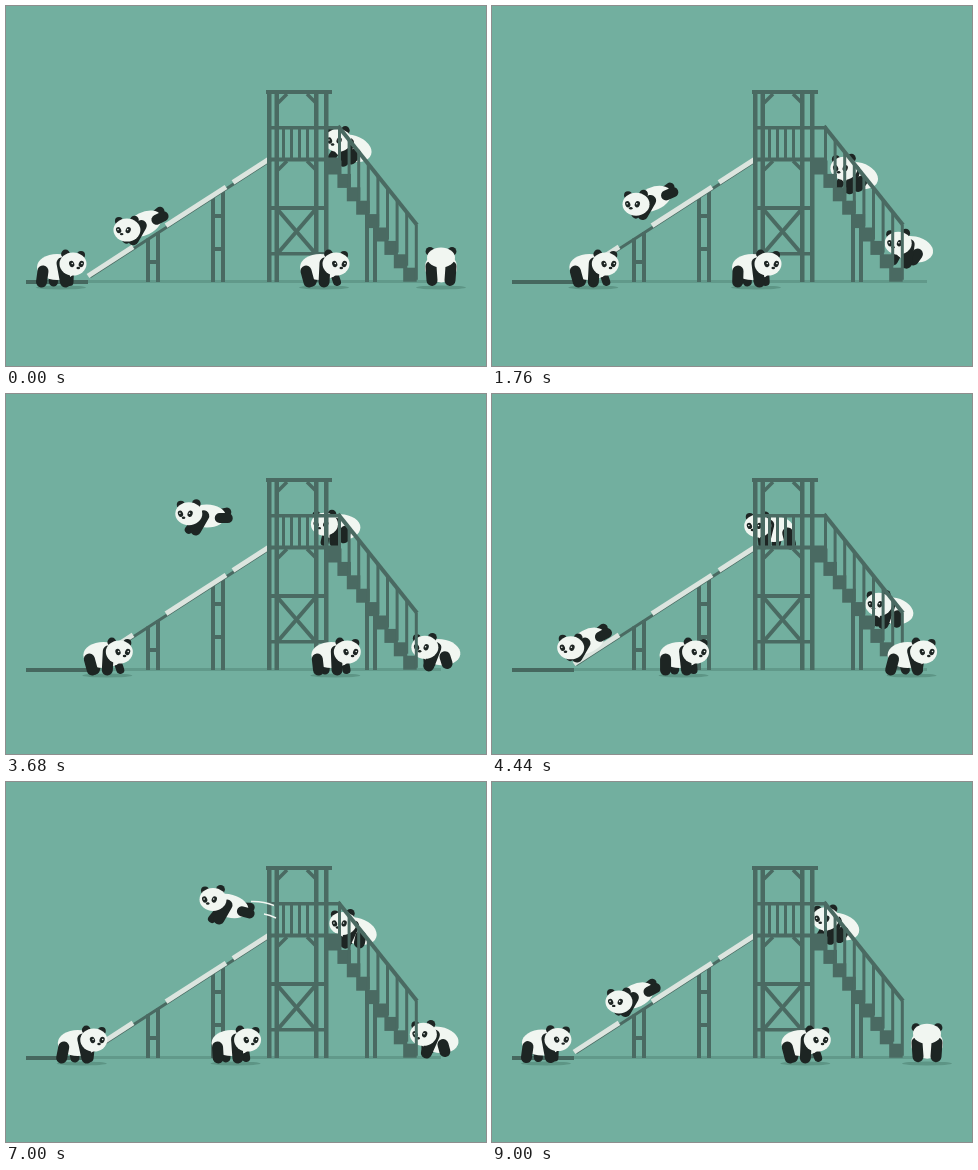
Animation of 480x360 px, one loop 9080 ms. Source, as an HTML page with a canvas:

```html
<!DOCTYPE html>
<html lang="en">
<head>
<meta charset="utf-8">
<title>Panda slide</title>
<style>
  html, body { margin: 0; width: 100%; height: 100%; overflow: hidden; background: #72af9f; }
  canvas { display: block; width: 480px; height: 360px; }
</style>
</head>
<body>
<canvas id="stage" width="480" height="360"></canvas>
<script>
const ctx = document.getElementById('stage').getContext('2d');
const BG = '#72af9f', WOOD = '#4a6a62', WHITE = '#f1f6f1', BLACK = '#1d2523';
const CHUTE = '#dce5df', GROUND = '#61998a', EDGE = '#46685f';
const LOOP = 9080, STEP = 40, LAST = 9000;

// Each panda runs the same lap, ahead of the clock by its own lead in seconds.
const LAP = 9.04;
const LEADS = [0, 2.215, 3.51, 5.75, 7.67];

const lerp = (a, b, k) => a + (b - a) * k;
const easeOut = k => 1 - (1 - k) ** 2;

// Each stage moves from the previous stage's end to its own; arc lifts the path.
// A positive lean raises the tail.
const STAGES = [
  { pose: 'walk',  end: 3.2,  x: 435, y: 262, lean: 0 },
  { pose: 'back',  end: 3.6,  x: 435, y: 260, lean: 0 },
  { pose: 'climb', end: 3.72, x: 428, y: 258, lean: -10 },
  { pose: 'climb', end: 5.75, x: 342, y: 142, lean: -18 },
  { pose: 'climb', end: 5.9,  x: 330, y: 134, lean: 0 },
  { pose: 'cross', end: 6.82, x: 276, y: 136, lean: 0, ease: easeOut },
  { pose: 'leap',  end: 7,    x: 220, y: 123, lean: -15 },
  { pose: 'leap',  end: 7.54, x: 154, y: 206, lean: 26, arc: 133 },
  { pose: 'slide', end: 7.95, x: 92,  y: 249, lean: 28 },
  { pose: 'slide', end: 8.1,  x: 66,  y: 256, lean: 8 },
  { pose: 'stop',  end: 8.3,  x: 49,  y: 257, lean: 0, ease: easeOut },
  { pose: 'stop',  end: 8.75, x: 47,  y: 257, lean: 0 },
  { pose: 'front', end: 8.85, x: 50,  y: 260, lean: 0 },
  { pose: 'walk',  end: LAP,  x: 55,  y: 262, lean: 0 }
];

function stateAt(p) {
  const i = STAGES.findIndex(s => p < s.end);
  const b = STAGES[i], a = STAGES.at(i - 1);
  const from = i ? a.end : 0;
  const k = (p - from) / (b.end - from), e = b.ease ? b.ease(k) : k;
  return {
    p,
    pose: b.pose,
    x: lerp(a.x, b.x, e),
    y: lerp(a.y, b.y, e) - (b.arc || 0) * k * (1 - k),
    lean: lerp(a.lean, b.lean, k) * Math.PI / 180
  };
}

function line(color, width, ...pts) {
  ctx.strokeStyle = color;
  ctx.lineWidth = width;
  ctx.beginPath();
  for (let i = 0; i < pts.length; i += 2) ctx.lineTo(pts[i], pts[i + 1]);
  ctx.stroke();
}

function oval(color, x, y, rx, ry = rx, turn = 0) {
  ctx.fillStyle = color;
  ctx.beginPath();
  ctx.ellipse(x, y, rx, ry, turn, 0, Math.PI * 2);
  ctx.fill();
}

function box(x, y, w, h, color = WOOD) {
  ctx.fillStyle = color;
  ctx.fillRect(x, y, w, h);
}

function drawSlide() {
  const at = x => 270 - (x - 82) * 0.645;
  for (const x of [140, 205]) {
    for (const post of [x, x + 10]) box(post, at(post), 4, 276 - at(post));
  }
  box(143, 254, 8, 4);
  for (const y of [208, 241]) box(208, y, 8, 4);
  line(WOOD, 3, 84, at(84) + 2, 266, at(266) + 2);
  for (const [a, b] of [[82, 127], [160, 220], [227, 265]]) line(CHUTE, 5, a, at(a), b, at(b));
  box(20, 274, 62, 4, EDGE);
}

function drawTower() {
  box(260, 84, 66, 4);
  for (const x of [261, 268.5, 308, 318]) box(x, 88, 4.5, 188);
  box(262, 120, 73, 3.5);
  box(261, 151.5, 72, 4);
  box(265, 200, 57, 4);
  box(265, 246, 57, 3.5);
  for (let x = 276; x < 308; x += 8) box(x, 123, 3, 29);
  for (const y of [88, 155]) {
    line(WOOD, 3.5, 272, y + 9, 281, y);
    line(WOOD, 3.5, 310, y + 9, 301, y);
  }
  line(WOOD, 4, 272, 204, 309, 247);
  line(WOOD, 4, 309, 204, 272, 247);
}

function drawStairs() {
  box(359, 207, 4, 69);
  box(367, 218, 4, 58);
  for (let i = 0; i < 9; i++) {
    box(322 + i * 9.4, 154.5 + i * 13.4, 13.5, 14);
    box(332 + i * 9.6, 122 + i * 12.1, 3, i < 8 ? 46 + i : 55);
  }
  line(WOOD, 4, 332, 120, 411, 219);
}

function drawFace(x, y, turn) {
  for (const side of [-1, 1]) {
    const ex = x + turn + side * 4.8;
    oval(BLACK, ex, y, 2.5, 3.2, side * 0.4);
    oval(WHITE, ex + 0.6, y - 0.5, 0.8);
  }
  oval(BLACK, x + turn * 1.5, y + 4, 1.8, 1.2);
}

function drawHead(x, y, turn) {
  oval(BLACK, x - 7.5, y - 10, 4.4);
  oval(BLACK, x + 8, y - 9, 4);
  oval(WHITE, x, y, 13.5, 11.5);
  drawFace(x, y, turn);
}

function drawWalker(swing, tuck) {
  const s = swing * 3;
  line(BLACK, 9, -9 + tuck, 2, -9 + tuck - s, 14 - tuck / 2);
  line(BLACK, 8, 9, 2, 10 + s, 14);
  oval(WHITE, -4, -1, 20, 13);
  line(BLACK, 11, -18 + tuck, 3, -18 + tuck + s, 14 - tuck / 2);
  line(BLACK, 11, 1, -5, 3 - s, 14);
}

function drawGlider() {
  line(BLACK, 9, -15, -2, -24, -4);
  oval(WHITE, -4, 0, 19, 11.5);
  line(BLACK, 10, -17, 2, -25, 2);
}

// Arms hang from the shoulder whatever the lean.
function drawArms() {
  line(BLACK, 8, 6, 4, 14, 14);
  line(BLACK, 11, -1, 0, 7, 14);
}

function drawUpright(facing) {
  oval(WHITE, 0, 1, 16, 15);
  for (const side of [-1, 1]) line(BLACK, 11, side * 10, 0, side * 9, 14);
  if (facing) {
    drawHead(0, -7, 0);
  } else {
    for (const side of [-1, 1]) oval(BLACK, side * 11, -15, 4.4);
    oval(WHITE, 0, -9, 14, 10);
  }
}

function drawPanda({ p, pose, x, y, lean }) {
  const gliding = pose === 'leap' || pose === 'slide';
  if (pose === 'walk' || pose === 'back') oval('rgba(80,132,118,.6)', x, 281.5, 25, 2);

  ctx.save();
  ctx.translate(x, y);
  ctx.lineCap = ctx.lineJoin = 'round';
  if (pose === 'back' || pose === 'front') {
    drawUpright(pose === 'front');
  } else {
    if (pose !== 'walk') ctx.scale(-1, 1);
    ctx.save();
    ctx.rotate(lean);
    if (gliding) drawGlider();
    else drawWalker(pose === 'stop' ? 0 : Math.cos((p - 2.2) / 0.6 * Math.PI * 2), pose === 'climb' ? 9 : 0);
    ctx.restore();
    if (gliding) drawArms();
    const [hx, hy] = gliding ? [14, -2] : [12, -4];
    const c = Math.cos(lean), s = Math.sin(lean);
    drawHead(hx * c - hy * s, hx * s + hy * c, 3.5);
  }
  ctx.restore();
}

function drawSwoosh({ p }) {
  if (p < 6.9 || p > 7.14) return;
  ctx.save();
  ctx.globalAlpha = Math.min(1, (7.14 - p) / 0.12);
  ctx.strokeStyle = WHITE;
  ctx.lineWidth = 1.5;
  ctx.beginPath();
  ctx.moveTo(245, 119.5);
  ctx.quadraticCurveTo(257, 119, 268, 123.5);
  ctx.moveTo(258, 132);
  ctx.quadraticCurveTo(264, 133, 270, 136);
  ctx.stroke();
  ctx.restore();
}

function draw(ms) {
  const t = Math.min(LAST, Math.floor(ms / STEP) * STEP) / 1000;
  const pandas = LEADS.map(lead => stateAt((lead + t) % LAP)).sort((a, b) => b.p - a.p);
  const behind = ({ pose }) => pose === 'climb' || pose === 'cross';

  box(0, 0, 480, 360, BG);
  box(20, 274, 415, 3, GROUND);
  pandas.filter(behind).forEach(drawPanda);
  drawSlide();
  drawTower();
  drawStairs();
  pandas.forEach(drawSwoosh);
  pandas.filter(s => !behind(s)).forEach(drawPanda);
}

const start = performance.now();
function tick() {
  draw((performance.now() - start) % LOOP);
  requestAnimationFrame(tick);
}
tick();
</script>
</body>
</html>
```
